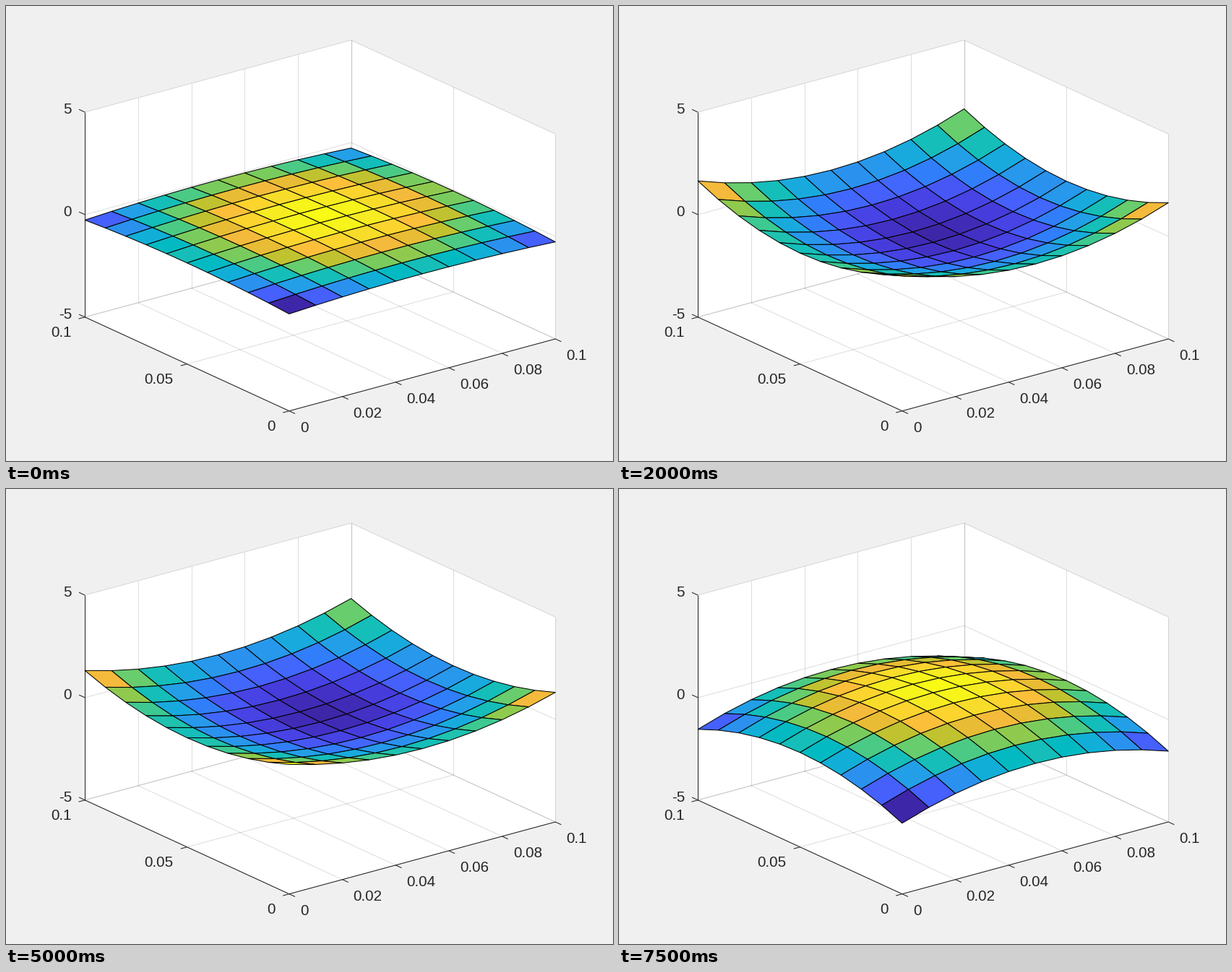
These frames come from a looping animation (840 px wide and 630 px high, 8000 ms). A matplotlib script:

```python
import numpy as np
import matplotlib.pyplot as plt
from matplotlib.animation import FuncAnimation
from matplotlib.collections import LineCollection, PolyCollection
from matplotlib.colors import LinearSegmentedColormap

W, H, DPI = 840, 630, 100
FRAMES, INTERVAL = 16, 500
N = 10
INK = "#262626"
LINE = 0.75  # one pixel, in points

# Orthographic view stretched to fill the axes rectangle
LEFT, RIGHT, TOP, BOTTOM = 0.13 * W, 0.905 * W, 0.075 * H, 0.89 * H
AZ, EL = np.radians(37.5), np.radians(30)
kx = (RIGHT - LEFT) / (np.cos(AZ) + np.sin(AZ))
ky = (BOTTOM - TOP) / ((np.sin(AZ) + np.cos(AZ)) * np.sin(EL) + np.cos(EL))
X = np.array([kx * np.cos(AZ), -ky * np.sin(AZ) * np.sin(EL)])
Y = np.array([-kx * np.sin(AZ), -ky * np.cos(AZ) * np.sin(EL)])
Z = np.array([0, -ky * np.cos(EL)])
ORIGIN = np.array([LEFT - Y[0], BOTTOM])

STOPS = [(0, "#3E26A8"), (4, "#4537D5"), (8, "#484DF0"), (12, "#4563FD"),
         (16, "#327CFC"), (20, "#2B91EF"), (24, "#20A5E3"), (28, "#08B5D0"),
         (30, "#02BAC3"), (32, "#19BFB6"), (36, "#37C897"), (40, "#64CD6F"),
         (44, "#9DC943"), (48, "#D1BF27"), (52, "#F8BA3D"), (54, "#FEC338"),
         (56, "#FCCF30"), (60, "#F5E924"), (63, "#F9FB15")]
cmap = LinearSegmentedColormap.from_list("surf", [(p / 63, c) for p, c in STOPS])


def project(x, y, z):
    """Map box coordinates in 0..1 to stage pixels."""
    x, y, z = (np.asarray(v, float)[..., None] for v in (x, y, z))
    return ORIGIN + x * X + y * Y + z * Z


def seg(a, b):
    return [project(*a), project(*b)]


def unit(v):
    return v / np.hypot(*v)


fig = plt.figure(figsize=(W / DPI, H / DPI), dpi=DPI, facecolor="#f0f0f0")
ax = fig.add_axes([0, 0, 1, 1])
ax.set_xlim(0, W)
ax.set_ylim(H, 0)
ax.axis("off")

# Walls and floor
hull = [(0, 0, 0), (1, 0, 0), (1, 0, 1), (1, 1, 1), (0, 1, 1), (0, 1, 0)]
ax.add_collection(PolyCollection([[project(*p) for p in hull]],
                                 facecolors="white", zorder=0))

xticks = np.linspace(0, 1, 6)
half = np.linspace(0, 1, 3)  # tick places on both y and z

grid = []
for t in xticks:
    grid += [seg((t, 0, 0), (t, 1, 0)), seg((t, 1, 0), (t, 1, 1))]
for t in half:
    grid += [seg((0, t, 0), (1, t, 0)), seg((1, t, 0), (1, t, 1)),
             seg((0, 1, t), (1, 1, t)), seg((1, 0, t), (1, 1, t))]
ax.add_collection(LineCollection(grid, colors=INK, alpha=0.15,
                                 linewidths=LINE, zorder=1))

# Axis lines with outward ticks
axes = [seg((0, 0, 0), (1, 0, 0)), seg((0, 0, 0), (0, 1, 0)),
        seg((0, 1, 0), (0, 1, 1))]


def add_tick(p, direction):
    start = project(*p)
    axes.append([start, start + 9 * unit(direction)])


for t in xticks:
    add_tick((t, 0, 0), -Y)
for t in half:
    add_tick((0, t, 0), -X)
    add_tick((0, 1, t), Y)
ax.add_collection(LineCollection(axes, colors=INK, linewidths=LINE, zorder=2))


def label(x, y, text, ha):
    ax.text(x, y + 7.2, text, ha=ha, va="baseline", color=INK,
            family="Liberation Sans", fontsize=20.5 * 72 / DPI, zorder=4)


for k, text in enumerate(["0", "0.02", "0.04", "0.06", "0.08", "0.1"]):
    label(407 + 73.7 * k, 582.3 - 19.9 * k, text, "left")
for k, text in enumerate(["0", "0.05", "0.1"]):
    label(373 - 141.3 * k, 580.5 - 65 * k, text, "right")
for k, text in enumerate(["-5", "0", "5"]):
    label(91, 426 - 141.9 * k, text, "right")

# Surface cells, sorted back to front
nodes = np.linspace(0, 1, N + 1)
gx, gy = np.meshgrid(nodes, nodes, indexing="ij")
bowl = (2 * gx - 1) ** 2 + (2 * gy - 1) ** 2
cells = sorted(((i, j) for i in range(N) for j in range(N)),
               key=lambda c: -sum(c))
ci, cj = np.array(cells).T
qi = ci[:, None] + [0, 1, 1, 0]
qj = cj[:, None] + [0, 0, 1, 1]
level = bowl[ci, cj] / 2

surface = PolyCollection([], edgecolors="black", linewidths=LINE, zorder=3)
ax.add_collection(surface)


def corner_lift(frame):
    """Pixel height of the corners: a sine with a fading start-up offset."""
    s = max(frame, 0.5)
    return 62.6 * np.sin(0.283 * (s - 1.15)) + 3.4 * np.exp(-0.28 * (s - 1))


def update(frame):
    lift = corner_lift(frame)
    z = 0.5 + lift * (0.75 * bowl - 0.5) / -Z[1]
    surface.set_verts(project(gx, gy, z)[qi, qj])
    surface.set_facecolor(cmap(level if lift > 0 else 1 - level))
    return [surface]


anim = FuncAnimation(fig, update, frames=FRAMES, interval=INTERVAL,
                     init_func=lambda: update(0), repeat=True,
                     repeat_delay=0, blit=False)
plt.show()
```
